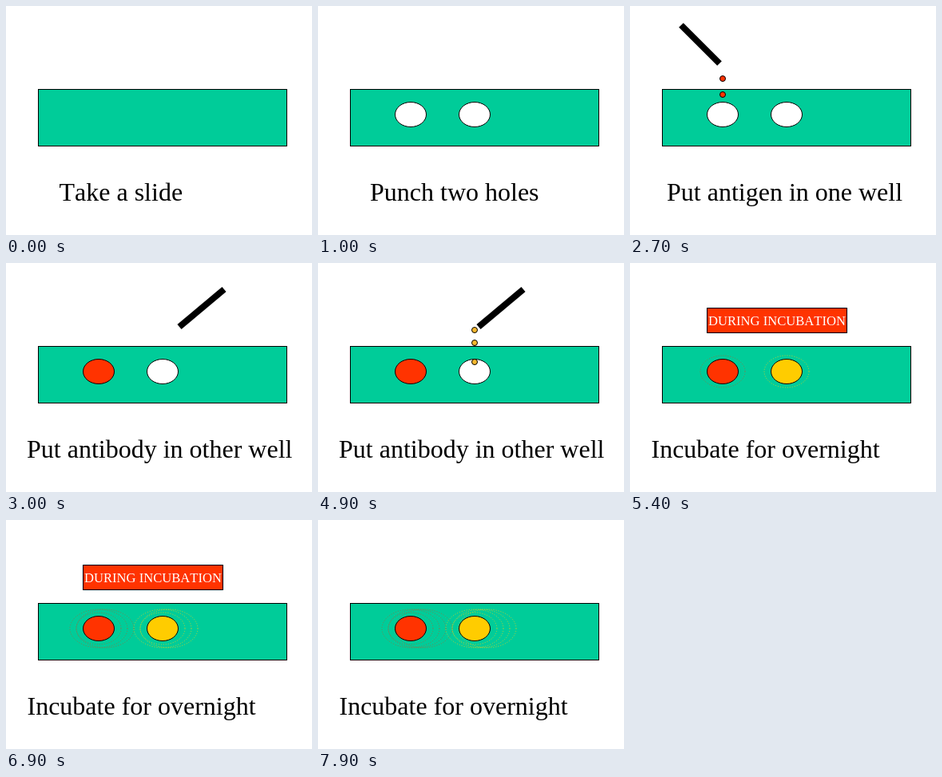
Write an HTML page with a canvas that moves like this. It is 383 px wide and 287 px high and loops after 8000 ms.

```html
<!DOCTYPE html>
<html lang="en">
<head>
<meta charset="utf-8">
<title>Antibody diffusion on a slide</title>
<style>
html, body { margin: 0; width: 100%; height: 100%; overflow: hidden; background: #fff; }
canvas { display: block; }
</style>
</head>
<body>
<canvas id="stage" width="383" height="287"></canvas>
<script>
const ctx = document.getElementById('stage').getContext('2d');
const LOOP = 8000, RED = '#ff3300', YELLOW = '#ffcc00', GREEN = '#00cc99';
const SERIF = '"Liberation Serif", "Times New Roman", serif';
const WELLS = [116, 196], WELL_Y = 136;

// start time, left edge, words
const CAPTIONS = [
  [0, 66.5, 'Take a slide'],
  [1000, 65, 'Punch two holes'],
  [2200, 46, 'Put antigen in one well'],
  [3000, 26, 'Put antibody in other well'],
  [5400, 26.5, 'Incubate for overnight']
];

// start time, left and right reach from the well centre, half height
const RINGS = [
  [5400, -28, 28, 20],
  [5900, -36, 36, 24],
  [6900, -28, 44, 24],
  [7900, -20, 52, 24]
];

function text(words, x, y, size, color) {
  ctx.font = `${size}px ${SERIF}`;
  ctx.fontKerning = 'none';
  ctx.fillStyle = color;
  ctx.fillText(words, x, y);
}

function box(x, y, w, h, fill) {
  ctx.fillStyle = fill;
  ctx.fillRect(x, y, w, h);
  ctx.strokeRect(x + 0.5, y + 0.5, w - 1, h - 1);
}

function oval(x, y, rx, ry, fill) {
  ctx.beginPath();
  ctx.ellipse(x, y, rx, ry, 0, 0, 2 * Math.PI);
  if (fill) {
    ctx.fillStyle = fill;
    ctx.fill();
  }
  ctx.stroke();
}

function pipette(x1, y1, x2, y2) {
  ctx.lineWidth = 8;
  ctx.beginPath();
  ctx.moveTo(x1, y1);
  ctx.lineTo(x2, y2);
  ctx.stroke();
  ctx.lineWidth = 1;
}

// Three drops, released two steps apart, each gaining speed as it falls
function drops(t, start, x, y, color) {
  const step = Math.floor((t - start) / 100);
  for (let i = 0; i < 3; i++) {
    const k = step - 2 * i;
    if (k >= 0 && k < 5) oval(x, y + 6 * k + k * k, 3.5, 3.5, color);
  }
}

function rings(t, x, color) {
  ctx.strokeStyle = color;
  ctx.setLineDash([1, 2]);
  for (const [start, left, right, ry] of RINGS) {
    if (t >= start) oval(x + (left + right) / 2, WELL_Y, (right - left) / 2, ry);
  }
  ctx.setLineDash([]);
  ctx.strokeStyle = '#000';
}

function draw(t) {
  ctx.fillStyle = '#fff';
  ctx.fillRect(0, 0, 383, 287);
  ctx.strokeStyle = '#000';
  ctx.lineWidth = 1;

  box(40, 104, 312, 72, GREEN);
  rings(t, WELLS[0], '#8a7a4a');
  rings(t, WELLS[1], '#c8d030');
  if (t >= 1000) {
    oval(WELLS[0], WELL_Y, 19.5, 15.5, t < 2800 ? '#fff' : RED);
    oval(WELLS[1], WELL_Y, 19.5, 15.5, t < 5300 ? '#fff' : YELLOW);
  }

  if (t >= 2000 && t < 2900) {
    const left = Math.max(0, 3 - Math.floor((t - 2000) / 50));
    const dx = -18 * left, dy = -7 * left;
    pipette(64 + dx, 24 + dy, 112 + dx, 72 + dy);
    if (t >= 2200 && t < 2800) drops(t, 2200, WELLS[0], 84, RED);
  } else if (t >= 3000 && t < 5400) {
    const dx = t < 4000 ? 16 : 0;
    pipette(257 + dx, 33, 201 + dx, 80);
    if (t >= 4500 && t < 5300) drops(t, 4500, WELLS[1], 84, '#f5b82e');
  }

  if ((t >= 5400 && t < 5900) || (t >= 6900 && t < 7900)) {
    box(96, 56, 176, 32, RED);
    text('DURING INCUBATION', 98, 78, 16.6, '#fff');
  }

  const [, x, words] = CAPTIONS.filter(c => t >= c[0]).pop();
  text(words, x, 244, 32, '#000');
}

const began = performance.now();
function frame() {
  draw((performance.now() - began) % LOOP);
  requestAnimationFrame(frame);
}
frame();
</script>
</body>
</html>
```
